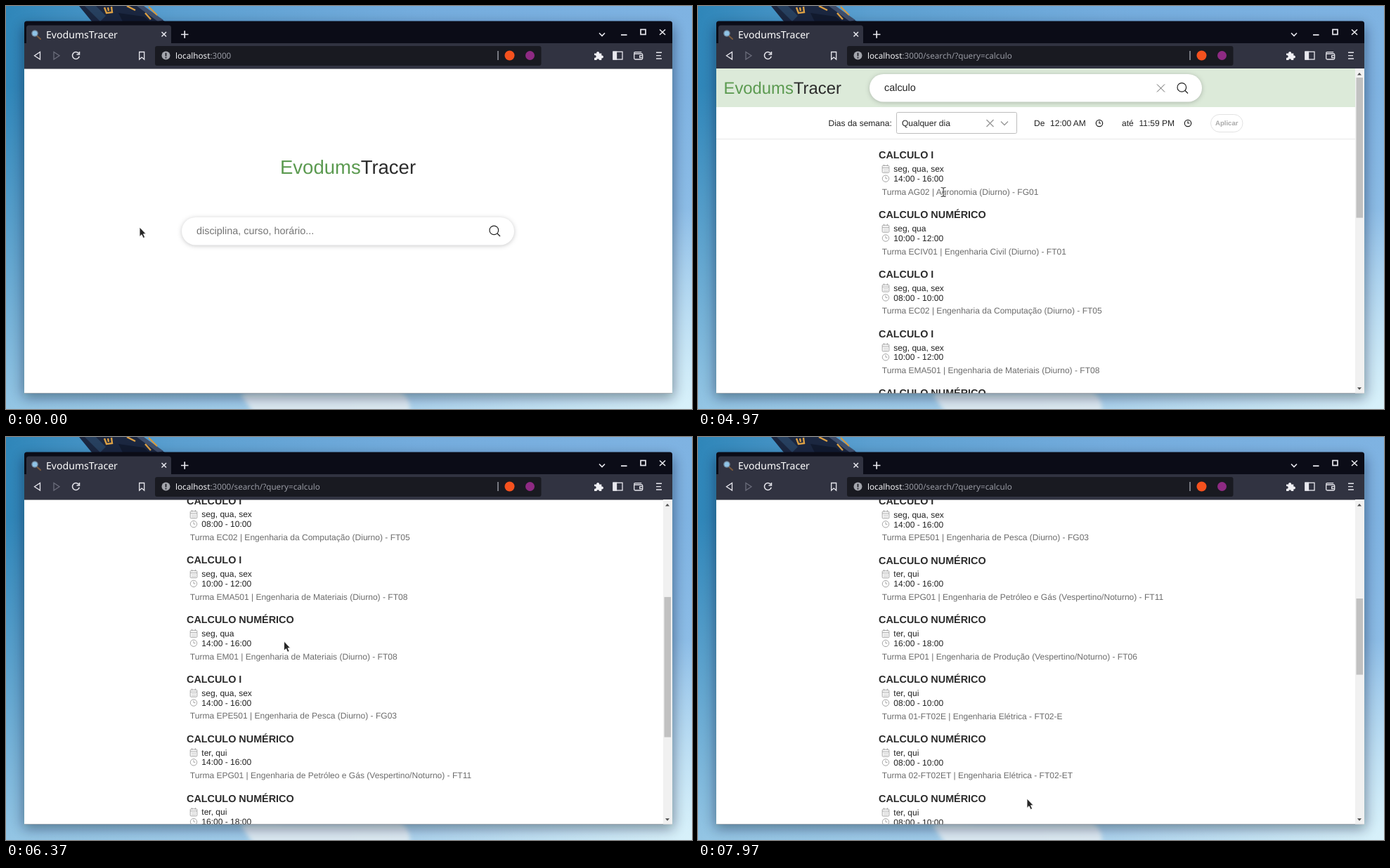
Write an HTML page that moves like this. It is 976 px wide and 574 px high and loops after 8 s.

```html
<!DOCTYPE html>
<html lang="pt">
<head>
<meta charset="utf-8">
<title>EvodumsTracer</title>
<style>
html, body { margin: 0; width: 100%; height: 100%; overflow: hidden; }
svg { display: block; width: 100vw; height: 100vh; }
text { font-family: "Liberation Sans", Arial, sans-serif; font-size: 12.04px; fill: #222; white-space: pre; text-rendering: geometricPrecision; }
.ui { font-family: "Noto Sans", "Open Sans", sans-serif; }
.big { font-size: 14.4px; }
.head { font-size: 14.4px; font-weight: 700; fill: #2b2b2b; }
.grey { fill: #6c6c6c; }
.line { fill: none; stroke: #e8e8ee; stroke-width: 1.3; }
.dark { fill: none; stroke: #222; stroke-width: 1.2; }
.pale { fill: none; stroke: #a6a6a6; stroke-width: 1; }
.pill { fill: #fff; filter: drop-shadow(0 1px 3px rgba(32, 33, 36, .25)); }
</style>
</head>
<body>
<svg viewBox="0 0 976 574" preserveAspectRatio="none">
  <defs>
    <linearGradient id="sky" x1="0" y1="0" x2="1" y2="0">
      <stop offset="0" stop-color="#2f86b9"/>
      <stop offset=".25" stop-color="#5b9fd0"/>
      <stop offset=".6" stop-color="#74acdd"/>
      <stop offset="1" stop-color="#7fb3e2"/>
    </linearGradient>
    <linearGradient id="haze" x1="0" y1="0" x2="0" y2="1">
      <stop offset=".2" stop-color="#a8d0f0" stop-opacity="0"/>
      <stop offset="1" stop-color="#b5daf2" stop-opacity=".75"/>
    </linearGradient>
    <radialGradient id="glow" cx="1" cy="1" r=".5">
      <stop offset="0" stop-color="#d8f1fa"/>
      <stop offset="1" stop-color="#d8f1fa" stop-opacity="0"/>
    </radialGradient>
    <filter id="soft" x="-20%" y="-20%" width="140%" height="140%"><feGaussianBlur stdDeviation="9"/></filter>
    <filter id="puff"><feGaussianBlur stdDeviation="3"/></filter>
    <clipPath id="view"><rect x="26" y="89" width="922" height="462.5"/></clipPath>
    <clipPath id="stage"><rect width="976" height="574"/></clipPath>

    <g id="lens" class="dark" stroke-width="1.4">
      <circle cx="694.3" cy="319.4" r="6.3"/><path d="M699 324l4 4"/>
    </g>
    <g id="clock"><circle r="4.7"/><path d="M0-3V0H2.4"/></g>
    <g id="date">
      <rect x="-4.8" y="-4.5" width="9.6" height="10" rx="1"/>
      <path d="M-4.8-1.5H4.8M-2.4-6.3v2.6M2.4-6.3v2.6"/>
      <path d="M-2.8 1h5.8M-2.8 3.4h5.8" stroke-dasharray="1.4 .8"/>
    </g>
  </defs>

  <g clip-path="url(#stage)">
    <rect width="976" height="574" fill="url(#sky)"/>
    <rect width="976" height="574" fill="url(#haze)"/>
    <rect width="976" height="574" fill="url(#glow)"/>
    <path d="M334 553Q350 546 400 550L560 548Q578 560 574 580H352Z" fill="#e6eff4" opacity=".85" filter="url(#puff)"/>
    <path d="M104 0H190L226 22H122Z" fill="#1b2740"/>
    <path d="M112 0h16l14 14-8 8z" fill="#27405f"/>
    <path d="M186 0h10l28 20-8 2z" fill="#3f4f6c"/>
    <path d="M160 10l36 5 9 7h-39z" fill="#121b2f"/>
    <path d="M140 2l3 8 8-1-1-8M145 2l1 5M172 0l12 6M198 10l8 9" fill="none" stroke="#dca044" stroke-width="2.4"/>
    <path d="M203 1l12 12" stroke="#d99a3c" stroke-width="2"/>
  </g>

  <rect x="24" y="28" width="926" height="530" rx="4" fill="#001020" opacity=".42" filter="url(#soft)"/>
  <path d="M26 551.5V25q0-3.500 3.500-3.500H944.500q3.500 0 3.500 3.500V551.500z" fill="#0b0c17"/>
  <path d="M29 53V31q0-3.500 3.500-3.500H231.500q3.500 0 3.500 3.500V53z" fill="#313341"/>
  <rect x="26" y="53" width="922" height="36.500" fill="#313341"/>
  <rect x="212" y="57" width="549.500" height="28" rx="3" fill="#191a21"/>

  <path d="M44.500 43l4.500 4" stroke="#7a5a3e" stroke-width="2.200" stroke-linecap="round"/>
  <circle cx="41" cy="39" r="4.200" fill="#8fc3e6" stroke="#6d7f92" stroke-width="1.300"/>
  <text class="ui" x="57" y="45.500" style="font-size:14.100px;font-weight:500;fill:#fff">EvodumsTracer</text>
  <g class="line">
    <path d="M221.500 37l6.500 6.500m0-6.500l-6.500 6.500" stroke-width="1.500"/>
    <path d="M249 40.500h10.500M254.200 35.200v10.500" stroke-width="1.700"/>
    <path d="M844 38.500l4 4 4-4" stroke-width="1.600"/>
    <path d="M875 41.200h8.500" stroke-width="1.800"/>
    <rect x="903" y="33.500" width="7" height="7" stroke-width="1.700"/>
    <path d="M930 33.500l8 7.500m0-7.500l-8 7.500" stroke-width="1.600"/>
    <path d="M48.500 65.500v10.500l-8-5.200z"/>
    <path d="M68 65.500v10.500l8-5.200z" stroke="#6b6d7b"/>
    <path d="M103.500 67.500a5 5 0 1 0 .8 4.300M104.500 65v4h-4" stroke-width="1.500"/>
    <path d="M189.700 65.500h7v10.500l-3.500-3-3.500 3z"/>
    <path d="M700 64v13" stroke="#aaacb5"/>
    <rect x="864" y="65.200" width="13" height="10.800"/>
    <path d="M864 65.200h4.500V76H864z" fill="#e8e8ee"/>
    <path d="M893.700 68v6.500q0 1.500 1.500 1.500h9q1.500 0 1.500-1.500V69.500q0-1.500-1.500-1.500h-9q-1.500 0-1.500-1.200t1.500-1.200h9M905.700 70.700h-4v3h4"/>
    <path d="M925 66.200h8M925 70.600h7M925 75h8" stroke-width="1.400"/>
  </g>
  <path d="M837 67.500h3.200a2 2 0 1 1 3.800 0h3.300v3a2 2 0 1 1 0 3.800V77h-3.300a1.800 1.800 0 1 0-3.600 0H837v-3.300a1.900 1.900 0 1 0 0-3.500z" fill="#f0f0f4"/>
  <circle cx="227.500" cy="70.500" r="6" fill="#a3a5ac"/>
  <path d="M227.500 66.800v4.600M227.500 72.800v1.700" stroke="#191a21" stroke-width="1.700"/>
  <circle cx="716.500" cy="70.500" r="7" fill="#f4511e"/>
  <circle cx="745.500" cy="70.500" r="6.500" fill="#8e2a83"/>
  <text class="ui" x="241" y="74.800" style="font-size:11.700px;fill:#f4f4f6">localhost<tspan id="path" fill="#989aa3"></tspan></text>

  <rect x="26" y="89.500" width="922" height="462" fill="#fff"/>
  <g clip-path="url(#view)">
    <g id="home">
      <text x="390" y="239" style="font-size:27.500px;fill:#2b2b2b"><tspan fill="#5b9a50">Evodums</tspan>Tracer</text>
      <rect class="pill" x="250" y="301" width="473" height="39.500" rx="19.750"/>
      <rect id="ring" class="dark" x="250.500" y="301.300" width="472" height="38.700" rx="19.350" style="stroke-width:1"/>
      <text id="hint" class="big" x="271" y="325" style="fill:#757575">disciplina, curso, horário...</text>
      <text id="typed" class="big" x="271" y="325"></text>
      <path id="caret" d="M.5 313v16" stroke="#222"/>
      <path id="clear" d="M659 315l11 11m0-11l-11 11" stroke="#666"/>
      <use href="#lens"/>
    </g>
    <g id="results">
      <g id="page">
        <rect x="26" y="89" width="909" height="55" fill="#dcead9"/>
        <text x="36.500" y="125" style="font-size:23.850px;fill:#2b2b2b"><tspan fill="#5b9a50">Evodums</tspan>Tracer</text>
        <g transform="translate(-6 -203.500)">
          <rect class="pill" x="250" y="300.500" width="473" height="39.500" rx="19.750"/>
          <text class="big" x="271" y="325">calculo</text>
          <path d="M659 315l11 11m0-11l-11 11" stroke="#666"/>
          <use href="#lens"/>
        </g>
        <text x="185.500" y="171">Dias da semana:</text>
        <rect x="282.500" y="151.500" width="171" height="30" rx="2" fill="#fff" stroke="#bdbdbd"/>
        <text x="290" y="171">Qualquer dia</text>
        <path d="M410.500 162l10 10m0-10l-10 10M431 164.500l5 5 5-5" fill="none" stroke="#999" stroke-width="1.400"/>
        <text x="478" y="171">De</text>
        <text x="501" y="171">12:00 AM</text>
        <use href="#clock" x="571" y="167" class="dark"/>
        <text x="603" y="171">até</text>
        <text x="627.500" y="171">11:59 PM</text>
        <use href="#clock" x="697" y="167" class="dark"/>
        <rect x="729.500" y="154.500" width="45.500" height="25" rx="12.500" fill="#fff" stroke="#e2e2e2"/>
        <text x="736" y="170.500" style="font-size:9.600px;font-weight:700;fill:#aaa">Aplicar</text>
        <path d="M26 189.500h909" stroke="#e8e8e8"/>
        <g id="list"></g>
      </g>
      <rect x="935" y="89" width="13" height="463" fill="#f1f1f1"/>
      <rect id="thumb" x="936.500" width="9.500" fill="#c1c1c1"/>
      <path id="up" d="M938 98.500h6l-3-3.500z"/>
      <path d="M938 543.200h6l-3 3.500z" fill="#505050"/>
    </g>
  </g>

  <g id="arrow">
    <path d="M0 0V13.500L3 10.700 5.200 15.500 7.700 14.400 5.500 9.800H9.300Z" fill="#262626" stroke="#fff" stroke-width=".9"/>
  </g>
  <g id="beam" fill="none">
    <path d="M-3.500-6.500Q0-6.500 0-5V5Q0 6.500-3.500 6.500M3.500-6.500Q0-6.500 0-5V5Q0 6.500 3.500 6.500M-1.500 0h3" stroke="#fff" stroke-width="2.600"/>
    <path d="M-3.500-6.500Q0-6.500 0-5V5Q0 6.500-3.500 6.500M3.500-6.500Q0-6.500 0-5V5Q0 6.500 3.500 6.500M-1.500 0h3" stroke="#444" stroke-width="1.200"/>
  </g>
</svg>
<script>
const LOOP = 8000, STEP = 84.8, VIEW = 462, TRACK = 436;
const PAGE_AT = 3830, MORE_AT = 7900;
const $ = id => document.getElementById(id);
const show = (id, on) => $(id).setAttribute('visibility', on ? 'inherit' : 'hidden');
const move = (id, x, y) => $(id).setAttribute('transform', `translate(${x} ${y})`);

// title suffix | days | hours | class
const courses = `I|seg, qua, sex|14:00 - 16:00|AG02 | Agronomia (Diurno) - FG01
NUMÉRICO|seg, qua|10:00 - 12:00|ECIV01 | Engenharia Civil (Diurno) - FT01
I|seg, qua, sex|08:00 - 10:00|EC02 | Engenharia da Computação (Diurno) - FT05
I|seg, qua, sex|10:00 - 12:00|EMA501 | Engenharia de Materiais (Diurno) - FT08
NUMÉRICO|seg, qua|14:00 - 16:00|EM01 | Engenharia de Materiais (Diurno) - FT08
I|seg, qua, sex|14:00 - 16:00|EPE501 | Engenharia de Pesca (Diurno) - FG03
NUMÉRICO|ter, qui|14:00 - 16:00|EPG01 | Engenharia de Petróleo e Gás (Vespertino/Noturno) - FT11
NUMÉRICO|ter, qui|16:00 - 18:00|EP01 | Engenharia de Produção (Vespertino/Noturno) - FT06
NUMÉRICO|ter, qui|08:00 - 10:00|01-FT02E | Engenharia Elétrica - FT02-E
NUMÉRICO|ter, qui|08:00 - 10:00|02-FT02ET | Engenharia Elétrica - FT02-ET
NUMÉRICO|ter, qui|08:00 - 10:00|`.split('\n');

$('list').innerHTML = courses.map((row, i) => {
  const [name, days, hours, ...rest] = row.split('|');
  return `<g id="course${i}" transform="translate(0 ${i * STEP})">
    <text class="head" x="257" y="217.300">CALCULO ${name}</text>
    <use href="#date" x="267" y="232" class="pale"/><text x="278.300" y="236.200">${days}</text>
    <use href="#clock" x="267" y="245.800" class="pale"/><text x="278.300" y="250">${hours}</text>
    <text class="grey" x="261.800" y="268.800">Turma ${rest.join('|')}</text></g>`;
}).join('');

const scrollKeys = [[4970, 0], [5770, 155], [6070, 155], [6170, 184.5], [6570, 414], [6810, 545.5]];
const mouseKeys = [
  [730, 190, 315], [950, 250, 320], [1170, 301, 321.5], [4270, 301, 321.5], [4500, 320, 334],
  [4800, 342, 272], [4940, 342, 272], [4970, 349, 265], [5500, 385, 282], [5770, 396, 289],
  [6170, 396, 289], [6570, 395, 295], [6830, 396, 308], [6970, 396, 308], [7080, 358, 352],
  [7280, 598, 440], [7400, 540, 505], [7500, 468, 515]];
// spans where the pointer is a text beam
const beams = [[950, 4450], [4950, 5030], [7040, 7090]];
const keystrokes = [2270, 2350, 2440, 2530, 2670, 2870, 2970];
const caretSpans = [[1430, 2030], [2270, 3570]];
const within = (spans, t) => spans.some(([a, b]) => t >= a && t < b);

// monotone cubic through [time, value...] keys
function at(keys, t, n = 1) {
  const last = keys.length - 1;
  if (t <= keys[0][0]) return keys[0][n];
  if (t >= keys[last][0]) return keys[last][n];
  const i = keys.findIndex(k => k[0] > t) - 1;
  const slope = j => (keys[j + 1][n] - keys[j][n]) / (keys[j + 1][0] - keys[j][0]);
  const tangent = j => {
    if (j === 0 || j === last) return 0;
    const a = slope(j - 1), b = slope(j);
    return a * b > 0 ? 2 * a * b / (a + b) : 0;
  };
  const h = keys[i + 1][0] - keys[i][0], u = (t - keys[i][0]) / h, v = 1 - u;
  return keys[i][n] * (1 + 2 * u) * v * v + keys[i + 1][n] * u * u * (3 - 2 * u)
    + h * u * v * (tangent(i) * v - tangent(i + 1) * u);
}

function render(t) {
  const found = t >= PAGE_AT;
  show('home', !found);
  show('results', found);
  $('path').textContent = t >= 3800 ? ':3000/search/?query=calculo' : ':3000';

  const x = at(mouseKeys, t, 1), y = at(mouseKeys, t, 2), beam = within(beams, t);
  show('arrow', !beam);
  show('beam', beam);
  move(beam ? 'beam' : 'arrow', x, y);

  if (!found) {
    const word = 'calculo'.slice(0, keystrokes.filter(k => t >= k).length);
    $('typed').textContent = word;
    show('hint', !word);
    show('ring', x >= 250);
    show('caret', within(caretSpans, t));
    move('caret', 271 + (word ? $('typed').getComputedTextLength() : 0), 0);
    $('clear').setAttribute('opacity', Math.max(0, Math.min(1, (t - 2250) / 260)));
    return;
  }
  const scroll = at(scrollKeys, t), more = t >= MORE_AT;
  const ratio = TRACK / (more ? 1857 : 1009);
  move('page', 0, -scroll);
  show('course10', more);
  $('thumb').setAttribute('y', 102 + scroll * ratio);
  $('thumb').setAttribute('height', VIEW * ratio);
  $('up').setAttribute('fill', scroll > 0 ? '#505050' : '#a3a3a3');
}

const start = performance.now();
function tick() {
  render((performance.now() - start) % LOOP);
  requestAnimationFrame(tick);
}
tick();
</script>
</body>
</html>
```
